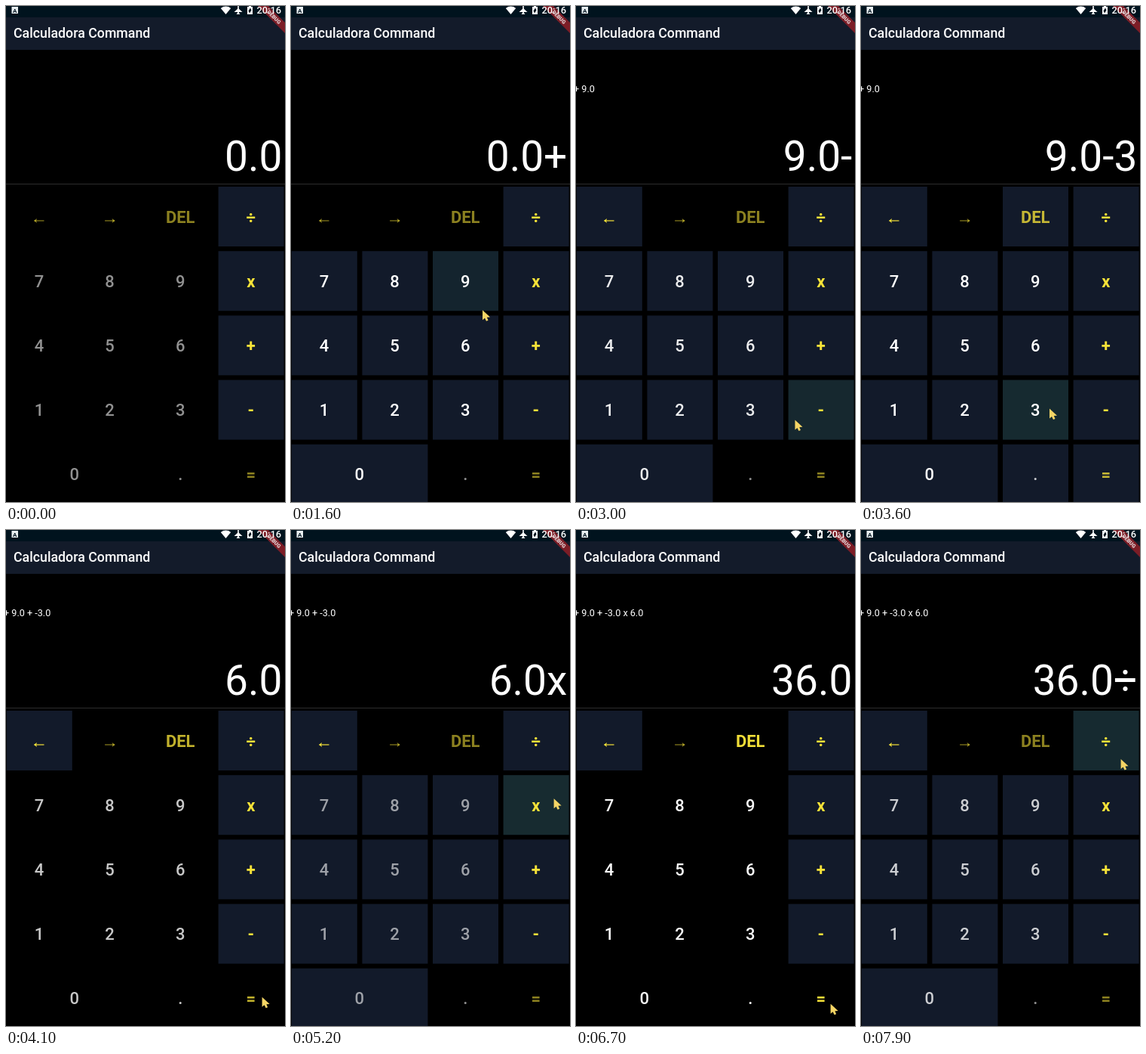
An HTML page with a canvas that plays this animation: 370x656 px, repeating every 8 s.

```html
<!DOCTYPE html>
<html lang="es">
<head>
<meta charset="utf-8">
<style>
  html, body { margin: 0; width: 100%; height: 100%; overflow: hidden; background: #000; }
  canvas { display: block; }
</style>
</head>
<body>
<canvas id="stage" width="370" height="656"></canvas>
<script>
const ctx = document.getElementById('stage').getContext('2d');
const LOOP = 8000, FADE = 200, RIPPLE = 350, HOLD = 150, TRAVEL = 300, DIM = 0.57;
const NAVY = '#121a2a', STATUS = '#00131e', YELLOW = '#f6e238', WHITE = '#fff';

// time, key, pointer tip inside that key
const presses = [
  [1150, '+', 57, 37], [1800, '9', 66, 78], [2400, '=', 56, 40],
  [2840, '-', 9, 53], [3500, '3', 62, 38], [4000, '=', 58, 38],
  [5190, 'x', 67, 31], [5850, '6', 66, 39], [6690, '=', 56, 47],
  [7800, '÷', 63, 64],
];

const calc = {
  '+': (a, b) => a + b, '-': (a, b) => a - b,
  'x': (a, b) => a * b, '÷': (a, b) => a / b,
};

const clamp = v => Math.max(0, Math.min(1, v));
const fixed = v => v.toFixed(1);

function groupOf(c) {
  if (c in calc) return 'op';
  if (c === '←') return 'undo';
  if (c === '→') return 'redo';
  return /\d/.test(c) ? 'digit' : 'edit';
}

const keys = [];
['←→D÷', '789x', '456+', '123-', '0 .='].forEach((row, r) => {
  [...row].forEach((c, i) => {
    if (c !== ' ') keys.push({
      id: c, label: c === 'D' ? 'DEL' : c, group: groupOf(c),
      x: 0.8 + i * 93.6, y: 239 + r * 85.2, w: c === '0' ? 180.6 : 87, h: 79,
      color: /[\d.]/.test(c) ? WHITE : YELLOW,
    });
  });
});

// Run the calculator once: what it shows, when key groups flip on and off, where the pointer goes
const screens = [{ time: 0, shown: '0.0', history: '' }];
const flips = { op: [-FADE], digit: [], edit: [], undo: [], redo: [] };
const moves = [];

function enable(group, on, time) {
  if (flips[group].length % 2 !== +on) flips[group].push(time);
}

let value = 0, op = '', operand = 0, shown = '0.0', history = [];
let leave = 300, spot = { x: 374, y: 530 };
for (const [time, id, dx, dy] of presses) {
  const key = keys.find(k => k.id === id);
  if (key.group === 'op') {
    op = id;
    shown = fixed(value) + op;
    enable('digit', true, time);
  } else if (key.group === 'digit') {
    operand = +id;
    shown += id;
    enable('edit', true, time);
  } else {
    value = calc[op](value, operand);
    shown = fixed(value);
    history.push(op === '-' ? `+ ${fixed(-operand)}` : `${op} ${fixed(operand)}`);
    enable('digit', false, time);
    enable('edit', false, time);
    enable('undo', true, time);
  }
  screens.push({ time, shown, history: history.join(' ') });
  const to = { x: key.x + dx, y: key.y + dy };
  moves.push({ start: leave + HOLD, from: spot, to });
  leave = time;
  spot = to;
}

function text(s, x, y, size, weight, color, align = 'left') {
  ctx.font = `${weight} ${size}px Roboto, sans-serif`;
  ctx.textAlign = align;
  ctx.fillStyle = color;
  ctx.fillText(s, x, y);
}

function rect(x, y, w, h, color) {
  ctx.fillStyle = color;
  ctx.fillRect(x, y, w, h);
}

function shape(points, color) {
  ctx.beginPath();
  for (let i = 0; i < points.length; i += 2) ctx.lineTo(points[i], points[i + 1]);
  ctx.closePath();
  ctx.fillStyle = color;
  ctx.fill();
}

function pointerAt(t) {
  const move = moves.filter(m => m.start <= t).pop();
  if (!move) return null;
  const u = clamp((t - move.start) / TRAVEL), e = u * u * (3 - 2 * u);
  const mix = (a, b) => a + (b - a) * e;
  return { x: mix(move.from.x, move.to.x), y: mix(move.from.y, move.to.y) };
}

function drawArrow(x, y, dir) {
  rect(x - 6.5, y - 0.6, 13, 1.2, YELLOW);
  const tip = x + 7 * dir, back = x + 3 * dir;
  shape([tip, y, back, y - 3, back + dir, y, back, y + 3], YELLOW);
}

function drawKey(k, t, pointer) {
  const changes = flips[k.group];
  const enabled = changes.filter(f => f <= t).length % 2 === 1;
  const level = changes.reduce((s, f, i) => s + (i % 2 ? -1 : 1) * clamp((t - f) / FADE), 0);
  if (enabled) {
    rect(k.x, k.y, k.w, k.h, NAVY);
    const over = pointer && pointer.x >= k.x && pointer.x < k.x + k.w
      && pointer.y >= k.y && pointer.y < k.y + k.h;
    const press = presses.find(p => p[1] === k.id && t >= p[0] && t < p[0] + RIPPLE);
    const glow = (over ? 0.14 : 0) + (press ? 0.1 * (1 - (t - press[0]) / RIPPLE) : 0);
    if (glow) rect(k.x, k.y, k.w, k.h, `rgba(40, 100, 70, ${glow})`);
  }
  ctx.globalAlpha = DIM + (1 - DIM) * level;
  const cx = k.x + k.w / 2 - 0.3;
  if (k.id === '←' || k.id === '→') drawArrow(cx, k.y + 45, k.id === '←' ? -1 : 1);
  else text(k.label, cx, k.y + 47.5, 22, k.color === YELLOW ? 700 : 500, k.color, 'center');
  ctx.globalAlpha = 1;
}

function drawHeader() {
  rect(0, 0, 370, 15, STATUS);
  rect(0, 15, 370, 43, '#131b2a');
  text('Calculadora Command', 10, 42, 17.75, 500, WHITE);

  // debug ribbon
  ctx.save();
  ctx.translate(355.5, 14.5);
  ctx.rotate(Math.PI / 4);
  rect(-40, -5, 80, 10, '#7c1d26');
  text('DEBUG', 0, 2.6, 7, 900, '#e8d8da', 'center');
  ctx.restore();

  // status icons
  rect(7.5, 1, 8.5, 9, '#e8eef0');
  text('A', 11.8, 8.5, 8, 700, STATUS, 'center');
  ctx.beginPath();
  ctx.moveTo(291.5, 11);
  ctx.arc(291.5, 11, 10.5, -Math.PI * 0.72, -Math.PI * 0.28);
  ctx.fillStyle = WHITE;
  ctx.fill();
  rect(307.2, 0, 1.6, 11, WHITE);
  shape([308, 3, 313.5, 8, 302.5, 8], WHITE);
  shape([308, 8, 310.5, 11, 305.5, 11], WHITE);
  rect(320, 1, 7, 10, WHITE);
  rect(322, 0, 3, 1, WHITE);
  shape([324, 2.5, 321.5, 6.5, 323, 9.5, 325.5, 5.5], STATUS);
  text('20:16', 332.5, 10.3, 12.8, 500, WHITE);
}

function drawPointer({ x, y }) {
  ctx.save();
  ctx.translate(x, y);
  shape([0, 0, 0, 13, 3, 10.5, 5, 14.5, 7.5, 13.5, 5.8, 9.5, 10, 9.2], '#f5d565');
  ctx.restore();
}

function frame(t) {
  const screen = screens.filter(s => s.time <= t).pop();
  const pointer = pointerAt(t);
  rect(0, 0, 370, 656, '#000');
  drawHeader();
  text(screen.history, -3, 114, 12.64, 400, WHITE);
  text(screen.shown, 366.3, 217.5, 55, 400, WHITE, 'right');
  rect(0, 235, 370, 1, '#2c2c2c');
  keys.forEach(k => drawKey(k, t, pointer));
  if (pointer) drawPointer(pointer);
}

const start = performance.now();
function tick() {
  frame((performance.now() - start) % LOOP);
  requestAnimationFrame(tick);
}
tick();
</script>
</body>
</html>
```
